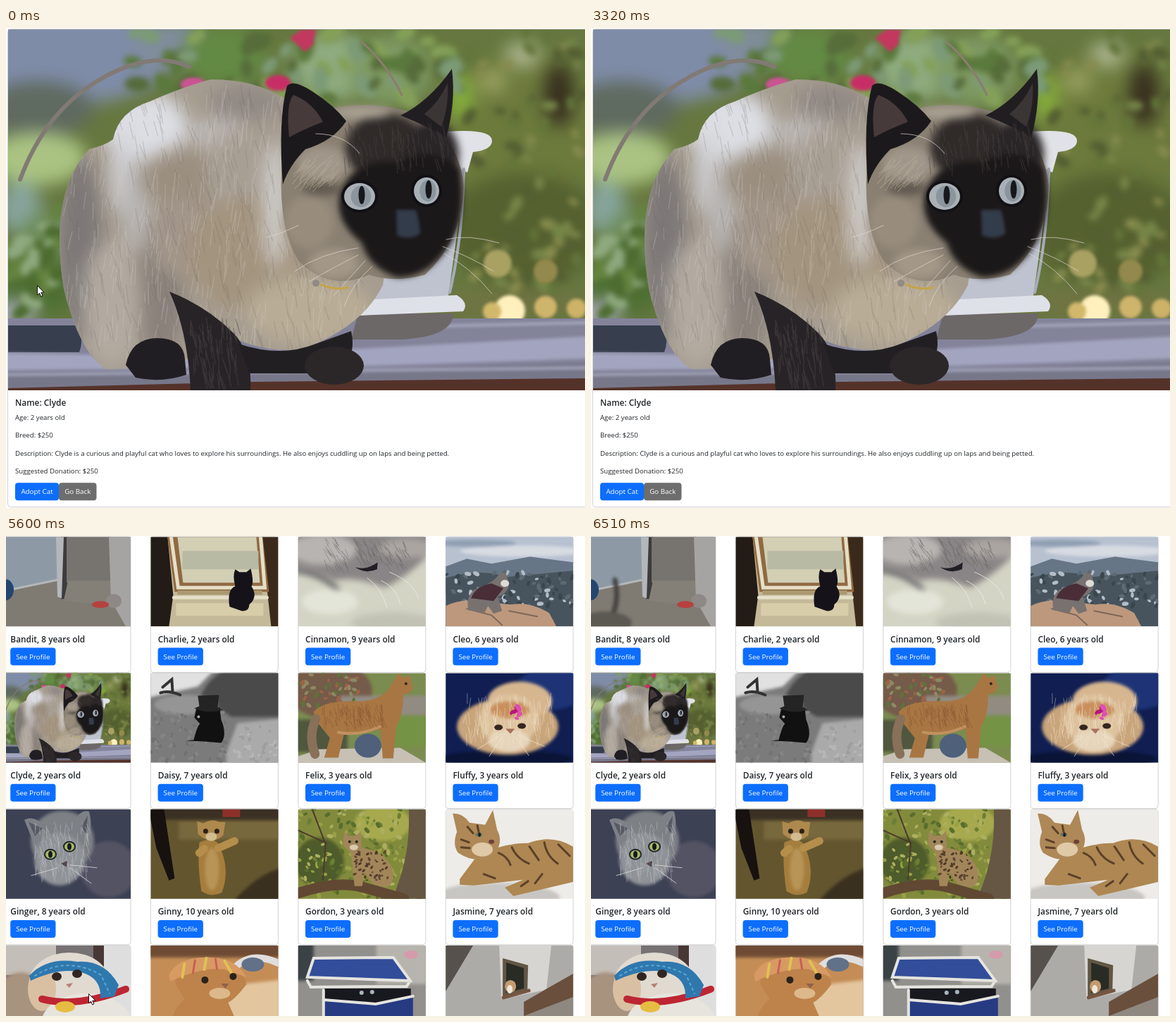
An HTML page that plays this animation: 822x681 px, repeating every 6530 ms.

```html
<!DOCTYPE html>
<html lang="en">
<head>
<meta charset="utf-8">
<title>Cat adoption</title>
<style>
html, body { margin: 0; width: 100%; height: 100%; overflow: hidden; background: #fff }
#stage { display: block; width: 822px; height: 681px; font: 9.64px "Open Sans", "Noto Sans", sans-serif; fill: #212529 }
.title { font-size: 11.9px; font-weight: 600 }
.btn { font-size: 9.8px; fill: #fff; text-anchor: middle }
</style>
</head>
<body>
<svg id="stage" viewBox="0 0 822 681"></svg>
<script>
let seed = 11;
const rnd = (a = 0, b = 1) => {
  seed = seed * 16807 % 2147483647;
  return +(a + (b - a) * seed / 2147483647).toFixed(1);
};

// Shape helpers
const P = (fill, d, more = '') => `<path fill="${fill}" d="${d}" ${more}/>`;
const L = (color, width, d, more = '') =>
  `<path fill="none" stroke="${color}" stroke-width="${width}" stroke-linecap="round" d="${d}" ${more}/>`;
const E = (fill, x, y, rx, ry = rx, more = '') =>
  `<ellipse fill="${fill}" cx="${x}" cy="${y}" rx="${rx}" ry="${ry}" ${more}/>`;
const R = (fill, x, y, w, h, r = 0, more = '') =>
  `<rect fill="${fill}" x="${x}" y="${y}" width="${w}" height="${h}" rx="${r}" ${more}/>`;
const T = (text, x, y, cls = '') => `<text class="${cls}" x="${x}" y="${y}">${text}</text>`;
const G = (body, more) => `<g ${more}>${body}</g>`;
const soft = (body, n = 2) => G(body, `filter="url(#blur${n})"`);
const base = color => R(color, 0, 0, 830, 520);
const photo = (art, x, y, w, h, box = '0 0 181 127') =>
  `<svg x="${x}" y="${y}" width="${w}" height="${h}" viewBox="${box}" preserveAspectRatio="none">${art}</svg>`;
const button = (label, x, y, w, h, fill, id = '') =>
  R(fill, x, y, w, h, 4, id && `id="${id}"`) + T(label, x + w / 2, y + h / 2 + 3.6, 'btn');

function specks(n, colors, x, y, w, h, size) {
  let out = '';
  for (let i = 0; i < n; i++) {
    const a = rnd(x, x + w), b = rnd(y, y + h), r = rnd(size / 2, size);
    out += E(colors[i % colors.length], a, b, r, r * .6, `transform="rotate(${rnd(0, 180)} ${a} ${b})"`);
  }
  return out;
}

function hairs(n, x, y, w, h, len, lean) {
  let d = '';
  for (let i = 0; i < n; i++) d += `M${rnd(x, x + w)} ${rnd(y, y + h)}l${rnd(lean - 4, lean + 4)} ${rnd(len * .5, len)}`;
  return d;
}

const bodyShape = 'M118 172Q142 166 152 158Q160 118 205 104Q250 84 290 73Q350 72 396 100L560 200L535 365Q505 425 420 456Q350 462 300 425L262 400L258 470Q200 485 142 484Q104 460 82 370Q60 235 118 172Z';

function clydeArt() {
  const garden = base('#66783f') + soft(
    E('#7f8ca8', 80, 35, 160, 75) + E('#5f6a60', 45, 115, 80, 40) + E('#aac382', 45, 185, 70, 38) +
    E('#86a49c', 20, 255, 30, 38) + E('#6d8c58', 60, 300, 40, 40) + E('#4f7034', 45, 365, 60, 45) +
    E('#a5a9b5', 10, 405, 35, 18) + E('#7f8d9b', 235, 22, 50, 34) + E('#638a44', 310, 40, 60, 40) +
    E('#8fac80', 465, 55, 60, 48) + E('#7f9a64', 545, 60, 60, 50) + E('#6c7a3c', 735, 150, 110, 120) +
    E('#55612f', 735, 285, 110, 80) + E('#37301f', 785, 95, 22, 46) + E('#aab48c', 733, 38, 26, 18) +
    E('#86b03c', 645, 98, 18, 34) + E('#6f7442', 700, 390, 130, 22) + E('#98a05f', 690, 75, 22, 18), 12) +
    soft(specks(60, ['#5a793c', '#84a058', '#7c9a76', '#566c3a'], 180, 5, 460, 95, 20) +
      specks(70, ['#768548', '#545f32', '#888b4e', '#63763a'], 655, 5, 165, 370, 14) +
      specks(30, ['#64833f', '#4d6c30', '#8fa97f'], 3, 260, 75, 145, 18), 4) +
    soft([[715, 401, 22, '#fff0bd'], [766, 396, 16, '#cfb46c'], [810, 398, 14, '#cdb268'], [690, 402, 13, '#d2b86b'], [698, 334, 20, '#a8a162'], [766, 345, 17, '#94894c']]
      .map(([x, y, r, c]) => E(c, x, y, r)).join('') +
      P('#c2385e', 'M403 14L420 2H440L436 24L424 34L414 24Z') + E('#c82e66', 386, 78, 18, 11) + E('#ca5592', 266, 80, 18, 10), 2) +
    L('#817a74', 6, 'M20 215Q55 120 130 75T260 55') + L('#8a7d70', 3, 'M505 20Q540 50 562 95');
  const table = R('#83839a', 0, 412, 830, 110) + P('#373f4e', 'M0 422H100Q112 440 104 460H0Z') +
    soft(P('#a3a5c0', 'M-20 461L160 464L500 455L850 436V468L500 480L-20 486Z') +
      P('#77778a', 'M-20 487L500 484L850 474V530H-20Z') + L('#b3b5cc', 3, 'M520 425L830 418M-10 492L830 482'), 2) +
    P('#553229', 'M0 511L350 502L822 497V514H0Z');
  const pot = P('#6d6868', 'M500 405H635Q635 438 560 442H490Z') + P('#bfc3cf', 'M515 170H657L627 388H490Z') +
    P('#e0e2e7', 'M625 147Q690 142 690 160Q690 173 663 176L655 205L628 190Z') +
    P('#dfe1e9', 'M500 386L640 379Q658 390 649 402L500 408Z') + L('#a7acb8', 4, 'M650 200Q648 300 630 375');
  const coat = P('#a69d90', bodyShape) + G(
    soft(E('#7d7877', 105, 310, 32, 130) + E('#89817a', 220, 370, 34, 100) + E('#b2aaa0', 150, 390, 42, 90) +
      E('#dcdee4', 195, 140, 62, 50) + E('#d2d3d8', 165, 205, 16, 60) + E('#b8b4b2', 185, 250, 20, 70) +
      E('#9b8f80', 250, 215, 58, 45) + E('#a2968a', 255, 300, 50, 60) + E('#918a85', 340, 106, 52, 26) +
      E('#bab5b2', 300, 150, 40, 25) + E('#a89f94', 330, 210, 45, 65) + E('#a3947f', 340, 320, 85, 80) +
      E('#b8ac96', 430, 400, 90, 50) + E('#ccc9c6', 382, 250, 18, 90), 12) +
    L('#d8d5d0', 1.2, hairs(420, 75, 80, 440, 360, 34, -3), 'opacity=".26"') +
    L('#6b625b', 1.2, hairs(380, 80, 80, 430, 380, 34, 6), 'opacity=".22"'), 'clip-path="url(#coat)"');
  const legs = P('#282326', 'M232 374Q285 395 322 432Q350 460 347 514H262Q258 430 232 374Z') +
    P('#221f23', 'M330 448Q390 468 440 448L490 430Q495 450 488 470L430 490H345Z') +
    P('#211e23', 'M170 478Q178 440 215 440Q252 440 254 470L256 492Q220 504 184 496Z') + E('#2b2729', 466, 479, 42, 27) +
    L('#50484a', 1.2, hairs(80, 262, 410, 65, 85, 25, 3), 'opacity=".5"');
  const head = P('#8a8072', 'M392 190Q400 130 465 114Q515 103 570 118Q642 145 650 225Q648 300 595 350Q550 362 515 350Q460 375 415 330Q385 280 392 190Z') +
    soft(E('#302a29', 540, 170, 58, 48) + E('#2a2527', 605, 180, 38, 48) + E('#a0968a', 450, 192, 36, 24) +
      E('#a8a092', 505, 120, 42, 9) + E('#615850', 448, 228, 28, 10) + E('#988d7d', 430, 275, 35, 38) + E('#a39787', 465, 335, 36, 22), 6) +
    soft(P('#1b1819', 'M474 235Q492 185 555 190Q605 165 644 200Q656 260 632 305Q600 355 555 354Q515 340 505 305Q466 275 474 235Z'), 4) +
    P('#1c191c', 'M393 222Q386 130 399 82Q408 72 435 90Q466 110 483 132Q465 160 425 172Q402 195 393 222Z') +
    P('#473a3b', 'M402 155Q397 108 408 95Q435 105 450 133Q420 145 402 155Z') +
    P('#211e21', 'M560 124Q600 105 633 58Q639 105 625 155Q600 140 560 124Z') +
    P('#3c3535', 'M594 122Q615 105 627 78Q629 112 618 140Z') +
    L('#b7ab98', 1.2, hairs(55, 420, 180, 55, 35, 18, -12), 'opacity=".5"') +
    L('#4b4342', 1.2, hairs(70, 480, 130, 150, 60, 25, 3), 'opacity=".5"');
  const eye = (x, y, rx, ry) => E('#111014', x, y, rx + 4, ry + 4) + E('#a9b0b6', x, y, rx, ry) +
    E('#8b959d', x + 2, y, rx * .65, ry * .8) + E('#16181c', x + 3, y - 2, 4.5, 13);
  const face = eye(502, 239, 22, 19) + eye(597, 231, 18, 19) +
    soft(P('#333c4a', 'M554 258L582 258Q588 278 588 292Q573 302 555 294Z'), 2) +
    L('#ded8d0', 1, 'M500 312Q445 320 410 345M500 322Q455 345 430 360M510 330L465 380M520 338Q490 365 480 395M620 310Q660 325 692 345M622 320Q660 340 690 377M625 300Q655 292 700 305M440 150Q480 150 502 178M415 280Q390 292 370 297', 'opacity=".7"') +
    L('#c4a54d', 3, 'M447 364Q470 373 485 368') + E('#8f8b84', 440, 362, 5);
  return garden + table + pot + coat + legs + head + face;
}
const clyde = clydeArt();

const sleepyHall = base('#7f7a72') + P('#8d9aa6', 'M0 0H80V60L0 77Z') +
  R('#3d3c3c', 82, 0, 10, 88) + R('#77736e', 90, 0, 63, 65) + P('#858077', 'M86 90L92 62H153V98Z') +
  P('#b4b7ba', 'M75 0H86L83 87L77 85Z') + P('#a6a4a2', 'M150 0H181V127H174L153 90Z') + L('#b4b7b8', 3, 'M0 77L77 61') +
  E('#24466f', 3, 75, 12, 15) + E('#8e8987', 157, 91, 11, 10) + E('#b5423f', 138, 96, 12, 5) +
  G(soft(P('#8e7355', 'M82 0H114Q115 25 107 45L99 30L88 42Q80 20 82 0Z') + E('#b5a58c', 98, 12, 9, 14)), 'id="jumper"') +
  G(soft(L('#454242', 7, 'M38 61Q44 85 36 108') + E('#5c5852', 24, 122, 38, 16)), 'id="tail"');

const windowCat = base('#c4b999') + P('#221b16', 'M0 0H24L32 83L26 127H0Z') + P('#3b2a1b', 'M157 0H181V127H171Z') +
  P('#8f6a42', 'M24 0H159L168 78H34Z') + P('#d2cfb5', 'M38 0H150L155 65H46Z') + R('#b9baa4', 45, 20, 108, 26) +
  L('#e6dfc7', 5, 'M29 0L39 72H162L156 0M33 86H165') + R('#aa9971', 38, 76, 120, 6) + P('#d8cda9', 'M36 94H160V112H36Z') +
  P('#151319', 'M112 99Q108 75 120 70Q116 55 120 46L126 50H136L142 45Q147 65 143 70Q153 85 140 96Q140 106 129 105Z');

const closeUp = base('#d3d4c4') + soft(P('#898485', 'M-9 -9H190V20Q158 55 123 72Q80 55 52 62Q20 45 -9 42Z') +
  E('#b8b4b1', 35, 18, 48, 22) + E('#aaa5a1', 155, 16, 40, 14) + L('#57565d', 6, 'M-5 48Q32 51 60 78') +
  E('#e4e5d9', 45, 92, 40, 18) + E('#c1c2b4', 135, 122, 60, 15), 4) +
  L('#5d5858', 1, hairs(100, 35, 0, 120, 40, 14, 7), 'opacity=".4"') + P('#211f25', 'M81 43Q96 48 113 36L112 46Q95 53 81 43Z') +
  L('#eeeee8', .8, 'M118 62Q140 72 145 95M130 50Q165 65 171 88M98 58Q120 75 126 100');

const mountain = base('#b7c1d0') + soft(E('#d7dbe2', 110, 20, 90, 8) + E('#909eb3', 40, 9, 60, 5)) +
  P('#667687', 'M0 42L30 31L65 38L120 28L181 36V80H0Z') + P('#47545d', 'M0 58Q55 44 85 57L181 48V127H0Z') +
  specks(110, ['#b4bdc7', '#5d6a74', '#39464c'], 0, 50, 181, 70, 5) +
  P('#bd987d', 'M0 98Q20 88 45 91L92 96Q120 91 147 108L157 127H0Z') + L('#806757', 2, 'M30 102L65 111L80 125M90 105L130 113') +
  P('#777270', 'M32 104Q28 78 48 72Q62 67 72 58L78 50L86 53L90 66Q89 80 74 85L80 105L68 109L60 98L55 108Z') +
  P('#492e38', 'M36 87Q42 70 65 66L82 73L68 91Z') + E('#dedbd6', 84, 66, 6, 5);

const topHat = base('#7b7b7b') + soft(P('#e1e1e1', 'M-9 -9H95L67 19L-9 36Z') + P('#4a4a4a', 'M70 34Q90 -9 130 -9H190V62H115Z') +
  P('#aaa', 'M107 114L123 71L190 64V137H108Z') + E('#959595', 50, 45, 45, 14)) +
  specks(90, ['#717171', '#858585'], 0, 55, 106, 70, 4) + specks(40, ['#9e9e9e', '#b6b6b6'], 118, 72, 63, 55, 4) +
  L('#333', 4, 'M14 28Q25 24 42 31M17 20L30 9L31 25') +
  P('#111', 'M61 95Q66 75 70 72L62 63L65 49H98L100 66Q109 88 100 99L76 97L50 96Z') + P('#242424', 'M67 32L97 31L95 49L103 52Q81 59 62 50L69 47Z') +
  E('#aaa', 68, 62, 2);

const standing = base('#7b8c50') + soft(E('#755b49', 45, 25, 60, 40) + R('#918b81', 60, 32, 140, 32) + R('#759345', 120, 60, 80, 45) + R('#50573f', -9, 66, 79, 46)) +
  specks(50, ['#9d6246', '#5f713d', '#8c8864'], 0, 0, 85, 50, 5) + P('#c6c0b5', 'M0 118L30 108L145 106L181 127H0Z') + E('#4f607a', 99, 103, 19, 17) +
  P('#a87643', 'M22 55Q37 38 85 40Q117 40 130 20L139 6L143 0L150 7L158 3L163 20Q160 30 149 30Q150 58 139 76L135 121H120L117 80L65 87L57 120H37L45 92L25 67Z') +
  L('#897058', 13, 'M25 65Q14 90 24 115') + L('#c19160', 4, 'M57 84Q85 90 116 76') +
  L('#754c2d', 1, hairs(90, 34, 43, 90, 26, 14, 3), 'opacity=".4"') + E('#2a241c', 153, 15, 2);

const fluffy = base('#101e52') + soft(E('#1d3375', 150, 22, 50, 30) + E('#0a1436', 85, 122, 95, 12) +
  E('#c9a57c', 88, 76, 72, 40) + E('#d6b68f', 105, 40, 46, 28) + E('#ddc29d', 90, 66, 42, 36) + E('#c98f5d', 91, 52, 28, 12) + E('#e6d5bb', 90, 96, 30, 16)) +
  L('#f3e7ce', 1, hairs(150, 28, 28, 124, 64, 18, 0), 'opacity=".4"') + E('#352622', 75, 77, 6, 4) + E('#352622', 108, 75, 6, 4) +
  P('#a8705f', 'M85 79H98L92 86Z') + L('#f3e7ce', .7, 'M78 88L45 108M80 90L62 118M102 88L140 104M100 91L118 117') + specks(8, ['#b51779', '#dd4eb0'], 93, 49, 12, 16, 6);

const greyFace = base('#3c4154') + soft(E('#545364', 150, 85, 40, 40) + E('#7d8085', 84, 45, 45, 43) + E('#8f9398', 80, 71, 36, 37)) +
  P('#7d8187', 'M43 47L30 15Q45 7 63 27ZM100 20Q108 0 122 3Q128 25 119 49Z') + P('#565a62', 'M45 38L36 18L56 27ZM111 24L120 9L118 36Z') +
  L('#cbced1', 1, hairs(100, 44, 18, 76, 72, 18, 2), 'opacity=".4"') + [[67, 64], [94, 53]].map(([x, y]) => E('#22262a', x, y, 9, 8) + E('#a5b965', x, y, 7, 6) + E('#15191b', x, y, 3, 5)).join('') +
  P('#55474a', 'M82 77L91 73L90 82Z') + L('#ddd', .8, 'M77 83L40 94M95 79L133 83M95 83L125 105');

const dancer = base('#63562f') + soft(R('#3a3024', -9, -9, 200, 24) + R('#78683d', 40, 17, 160, 26) + P('#3a301f', 'M112 137Q150 91 190 82V137Z')) +
  P('#17120f', 'M0 0H19L34 98L26 101L8 55L0 15Z') + R('#8d302a', 102, 0, 25, 11) +
  G(P('#a57d3d', 'M69 47Q95 35 101 60Q112 90 101 118Q87 126 72 116Q66 78 69 47Z') + soft(E('#b89557', 87, 85, 10, 30)) +
    P('#ae894d', 'M67 35L66 17L75 20Q87 13 97 18L106 18L103 37Q86 52 67 35Z') + E('#2a211a', 78, 31, 3.5) + E('#2a211a', 94, 31, 3.5) + E('#d2bd91', 86, 39, 8, 6), 'id="dancer"') +
  L('#b58e4b', 11, '', 'id="arms"');

const leopard = base('#828b3c') + soft(E('#a7a94e', 120, 20, 40, 25) + E('#4e5b2a', 30, 75, 35, 35)) +
  specks(190, ['#596d2c', '#98a145', '#6c7e34', '#acaf60'], 0, 0, 181, 127, 5) + P('#665744', 'M157 0H181V127H133Q160 70 157 0Z') +
  L('#604832', 15, 'M0 119Q55 100 93 111L150 127') + L('#4c3a2b', 2, 'M20 0L39 50L35 100M0 30L40 48') +
  P('#a2865a', 'M75 62L64 51L65 31L72 38L83 37L89 31L90 55Q119 57 133 82Q140 107 123 111L106 106L94 89L91 109H80Z') +
  specks(50, ['#4e3a28', '#5d452f'], 80, 60, 47, 42, 3) + E('#23291d', 73, 46, 2) + E('#23291d', 83, 46, 2) + E('#d9caad', 79, 54, 6, 4);

const lounging = base('#eeece8') + soft(E('#c8c6c2', 72, 126, 90, 22)) +
  P('#ae8752', 'M46 64Q88 47 117 48Q151 35 181 53V103L135 114L96 123L84 111L110 100L40 108L20 107L20 99Z') +
  P('#ae8857', 'M16 32L10 6Q24 5 34 19L56 22L67 1L73 29Q84 50 65 66Q43 78 18 62Q9 51 16 32Z') + E('#e0c9a6', 52, 57, 15, 10) +
  L('#5b4129', 3, 'M31 25L39 34M45 23L47 33M22 43L33 47M22 54L34 55M75 62Q88 67 92 79M94 54Q101 70 118 77M119 53L132 72M140 47Q143 66 159 77M160 50L176 66M54 92L70 98M107 109L117 102M127 105L137 92') +
  E('#6a7661', 47, 36, 5, 3) + E('#20211c', 48, 36, 2, 3) + E('#6d4038', 65, 46, 4, 3);

const blueCap = base('#777273') + R('#c4beb8', 0, 0, 75, 42) + R('#493735', 128, 0, 15, 60) + R('#dedede', 143, 0, 38, 127) + soft(E('#a8937f', 25, 88, 40, 50)) +
  E('#e1dad1', 94, 52, 57, 42) + E('#dac0a2', 55, 62, 20, 31) + E('#e7e4de', 118, 111, 64, 43) + L('#bd2632', 10, 'M55 76Q105 89 174 62') +
  P('#2f78ae', 'M37 43Q62 16 105 23Q144 20 164 56L158 72L138 75Q140 46 111 38Q80 31 39 50Z') + L('#5ba6d1', 2, 'M45 43Q90 14 139 42L151 68', 'stroke-dasharray="3 5"') +
  E('#30251f', 76, 44, 7, 6) + E('#30251f', 105, 40, 7, 6) + P('#b98075', 'M89 55L99 53L94 60Z') + E('#e6bd43', 88, 87, 14, 8);

const towelCat = base('#c58d56') + soft(R('#6f4b34', -9, -9, 200, 26) + P('#e3c59e', 'M84 60L190 48V137H84Z')) + L('#e0dede', 10, 'M118 33Q142 7 181 25') + E('#607188', 145, 27, 16, 10) +
  P('#bd834b', 'M35 55Q33 31 77 29Q132 27 136 55Q121 75 110 81L130 127H29Q25 95 48 76Z') + P('#d79a63', 'M26 42Q37 16 85 17Q120 17 136 45L105 34Q72 30 28 51Z') +
  L('#dfc154', 4, 'M48 26L45 45M79 18L76 34M105 22L116 41') + L('#c76154', 3, 'M63 21L60 39M92 19L94 33') + E('#29231b', 77, 49, 5) + E('#29231b', 117, 44, 5) + P('#92604c', 'M100 54H111L106 61Z') + E('#dcb88a', 98, 68, 15, 8);

const boxCat = base('#91908c') + soft(R('#3b4246', -9, -9, 31, 59) + R('#b7b4ad', 111, -9, 80, 64)) +
  P('#18191f', 'M35 61H160V95H36Z') + P('#273b83', 'M36 75L109 83L163 72V127H36Z') + P('#324d99', 'M22 18L135 17L159 50L13 45Z') +
  L('#e5e4df', 4, 'M22 18L135 17L159 50L13 45ZM13 50L18 59L154 58L159 50M36 63V127M36 77L110 83L163 72') + E('#a8b5bc', 90, 67, 3) + E('#a8b5bc', 105, 66, 3) + E('#d49bad', 160, 13, 10, 6);

const stairs = base('#adaba8') + P('#57514e', 'M0 0H39L0 65Z') + P('#d6d5d2', 'M76 0H150L143 63L79 76Z') + P('#625644', 'M81 18L117 28L116 65L81 74Z') + P('#292b25', 'M86 24L111 32V61L86 67Z') +
  L('#765641', 5, 'M82 74L118 64') + P('#694f3c', 'M111 80L181 40V76L111 101Z') + P('#8f8880', 'M111 100L181 73V127H111Z') + E('#c49b70', 92, 58, 8, 9) + E('#eee7db', 91, 62, 4, 6);

const cats = [
  ['Bandit', 8, sleepyHall], ['Charlie', 2, windowCat], ['Cinnamon', 9, closeUp], ['Cleo', 6, mountain],
  ['Clyde', 2, clyde, '3 2 820 512'], ['Daisy', 7, topHat], ['Felix', 3, standing], ['Fluffy', 3, fluffy],
  ['Ginger', 8, greyFace], ['Ginny', 10, dancer], ['Gordon', 3, leopard], ['Jasmine', 7, lounging],
  ['', 0, blueCap], ['', 0, towelCat], ['', 0, boxCat], ['', 0, stairs]
];
const card = ([name, age, art, box], i) => {
  const x = -4 + 209.4 * (i % 4), y = 1.3 + 193.2 * (i >> 2);
  return R('#fff', x, y - .3, 181, 192.5, 4, 'stroke="#d2d2d2"') + photo(art, x, y, 181, 127, box) +
    (name && T(`${name}, ${age} years old`, x + 10.3, y + 149.5, 'title') + button('See Profile', x + 10.2, y + 157.2, 64.3, 25, '#0d6efd'));
};

const blur = n => `<filter id="blur${n}" x="-20%" y="-20%" width="140%" height="140%" color-interpolation-filters="sRGB"><feGaussianBlur stdDeviation="${n}"/></filter>`;
const profile = R('#fff', 2.5, 1.5, 830, 678, 4, 'stroke="#d2d2d2"') + photo(clyde, 3, 2, 820, 512, '3 2 820 512') +
  T('Name: Clyde', 13, 536, 'title') + T('Age: 2 years old', 13, 556) + T('Breed: $250', 13, 581.3) +
  T('Description: Clyde is a curious and playful cat who loves to explore his surroundings. He also enjoys cuddling up on laps and being petted.', 13, 606.5) +
  T('Suggested Donation: $250', 13, 632) +
  button('Adopt Cat', 13, 645.3, 62, 25, '#0d6efd') + button('Go Back', 75, 645.3, 53.5, 25, '#6c6d6c', 'back');

const outline = 'stroke="#000" stroke-width=".9" stroke-linejoin="round"';
const $ = id => document.getElementById(id);
$('stage').innerHTML = `<defs>${[2, 4, 6, 12].map(blur).join('')}<clipPath id="coat"><path d="${bodyShape}"/></clipPath></defs>` +
  G(profile, 'id="profile"') + G(cats.map(card).join(''), 'id="grid"') +
  G(P('#fff', 'M.5 .5V14L3.5 11L5.7 16L8 15L5.8 10.2H10Z', `id="arrow" ${outline}`) +
    P('#fff', 'M4 10V1.8Q5.5 0 7 1.8V6Q8.5 5 9.5 6.5Q11 5.7 11.5 7.3Q13 7 13 9V12L11.5 17H5L1 11.5Q1 9 4 11Z', `id="hand" ${outline}`), 'id="cursor"');

// Pointer trips: stops of tick, x, y; the pointer rests between trips
const trips = [
  [[0, 44, 365], [3, 230, 327], [5, 415, 372], [7, 488, 473], [10, 422, 580]],
  [[11, 422, 580], [12, 508, 525], [18, 747, 617], [21, 788, 668], [22, 790, 690]],
  [[31, 331, 659], [33, 160, 632], [34, 115, 648]],
  [[37, 117, 649], [40, 768, 668], [42, 800, 700]]
];

// Smooth curve through the stops, still at both ends
function pointer(k) {
  const trip = trips.filter(s => s[0][0] <= k).pop();
  const i = trip.findIndex(s => s[0] > k);
  if (i < 0) return trip.at(-1).slice(1);
  const a = trip[i - 1], b = trip[i], span = b[0] - a[0], u = (k - a[0]) / span;
  const slope = (j, axis) => {
    const p = trip[j - 1], n = trip[j + 1];
    return p && n ? (n[axis] - p[axis]) / (n[0] - p[0]) * span : 0;
  };
  return [1, 2].map(axis => a[axis] + (b[axis] - a[axis]) * u * u * (3 - 2 * u) +
    slope(i - 1, axis) * u * (1 - u) ** 2 - slope(i, axis) * u * u * (1 - u));
}

const show = (id, on) => $(id).setAttribute('visibility', on ? 'inherit' : 'hidden');
const move = (id, x, y) => $(id).setAttribute('transform', `translate(${x} ${y})`);

function draw(now) {
  const t = now % 6530, k = Math.floor((t + 17) / 151.4), listing = t >= 5600;
  $('profile').style.display = listing ? 'none' : '';
  $('grid').style.display = listing ? '' : 'none';

  move('cursor', ...pointer(k));
  const hover = k >= 34 && !listing;
  show('hand', hover);
  show('arrow', !hover);
  $('back').setAttribute('fill', hover ? '#5c636a' : '#6c6d6c');

  if (listing) {
    const s = Math.max(0, Math.sin(Math.PI * (k - 37) / 6)), fall = k - 40;
    show('jumper', fall > -2 && fall < 3);
    move('jumper', -22 * Math.max(0, fall), fall * 28);
    show('tail', fall > 2);
    move('dancer', 4 * s, -9 * s);
    $('arms').setAttribute('d', `M76 ${56 - 7 * s}L${69 - 3 * s} ${62 - 13 * s}M96 ${55 - 6 * s}L${119 - 13 * s} ${45 - 5 * s}`);
  }
  requestAnimationFrame(() => draw(performance.now() - start));
}
const start = performance.now();
draw(0);
</script>
</body>
</html>
```
